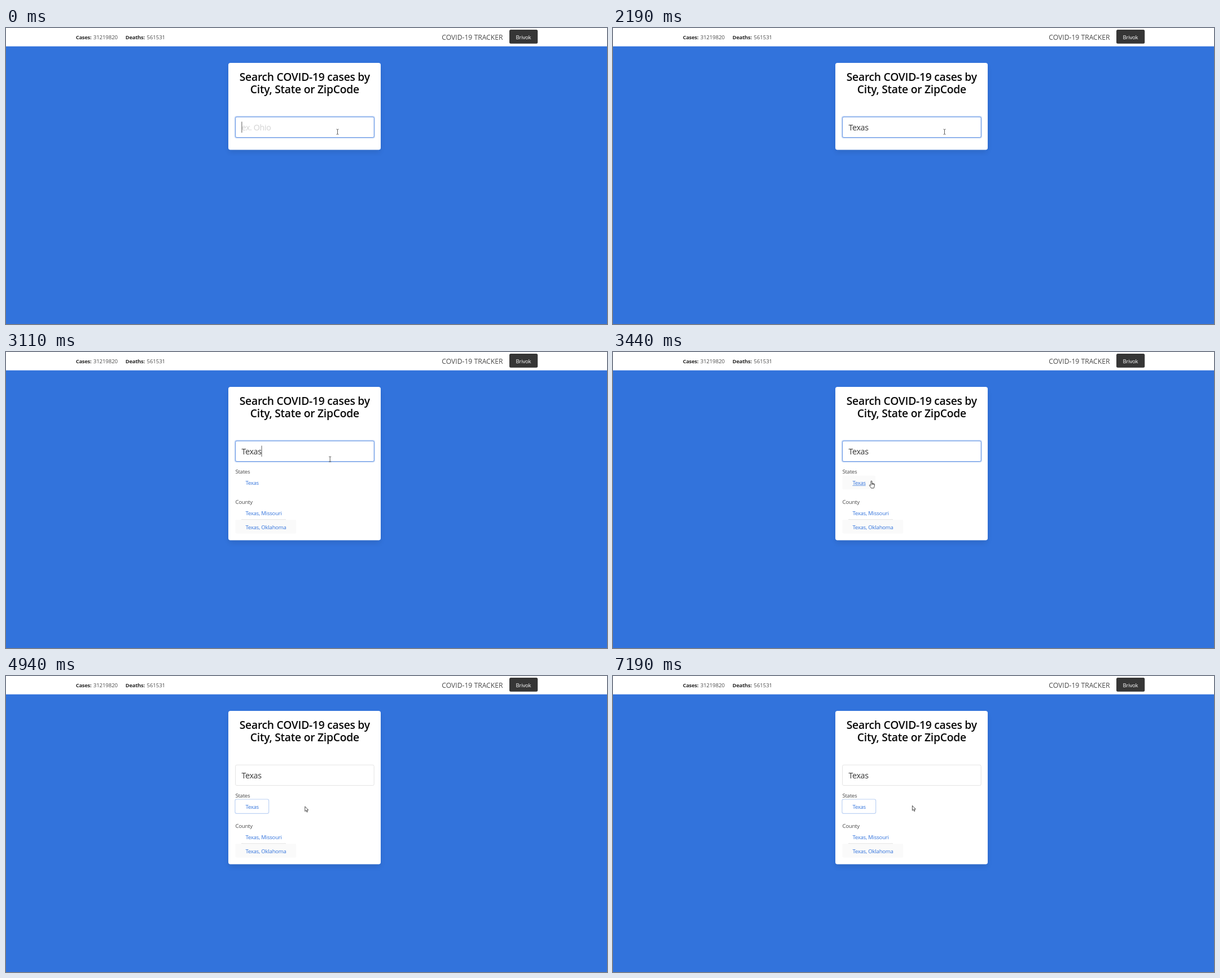
Recreate the animation shown at these times as an HTML page. Size 1065x526 px, loop 8000 ms.

```html
<!DOCTYPE html>
<html lang="en">
<head>
<meta charset="utf-8">
<title>Case search</title>
<style>
html, body { margin: 0; width: 100%; height: 100%; overflow: hidden; background: #3273dc; }
svg { display: block; width: 100%; height: 100%; }
text { font: 9.6px "Open Sans", "Noto Sans", sans-serif; letter-spacing: -.025em; fill: #4a4a4a; white-space: pre; }
.strong { font-size: 9.4px; font-weight: 700; fill: #2b2b2b; }
.num { letter-spacing: -.01em; }
.brand { font-size: 12.1px; letter-spacing: .002em; }
.title { font-size: 19.3px; font-weight: 600; letter-spacing: -.0135em; fill: #0a0a0a; }
.mid { text-anchor: middle; }
.field { font-size: 14.3px; fill: #363636; }
.link { fill: #3273dc; }
.cursor { fill: #fff; stroke: #111; stroke-width: .75; stroke-linejoin: round; }
</style>
</head>
<body>
<svg viewBox="0 0 1065 526">
  <defs>
    <filter id="blur" x="-20%" y="-20%" width="140%" height="150%"><feGaussianBlur stdDeviation="5"/></filter>
  </defs>
  <rect width="1065" height="526" fill="#3273dc"/>
  <rect width="1065" height="32.6" fill="#fff"/>
  <text class="strong" x="123.7" y="19.8">Cases:</text>
  <text class="num" x="154.8" y="19.8">31219820</text>
  <text class="strong" x="211.8" y="19.8">Deaths:</text>
  <text class="num" x="249.6" y="19.8">561531</text>
  <text class="brand" x="772.3" y="20.5">COVID-19 TRACKER</text>
  <rect x="892" y="3.1" width="50.2" height="24.6" rx="2.5" fill="#363636"/>
  <text class="mid" x="917" y="19.8" style="fill:#fff">Brivok</text>

  <rect id="shadow" x="395.2" y="68.2" width="267.6" fill="#0a0a0a" opacity=".11" filter="url(#blur)"/>
  <rect id="card" x="394" y="62" width="270" rx="3.75" fill="#fff"/>
  <text class="title mid" x="529.3" y="93.7">Search COVID-19 cases by</text>
  <text class="title mid" x="529.3" y="116.3">City, State or ZipCode</text>

  <rect id="glow" x="405.6" y="157.2" width="247.6" height="38.2" rx="3.2" fill="none" stroke="#3273dc" stroke-opacity=".25" stroke-width="1.7"/>
  <rect id="box" x="406.6" y="158.1" width="245.6" height="36.4" rx="2.4" fill="#fff" stroke-width=".75"/>
  <text id="hint" class="field" x="417.5" y="182" fill-opacity=".22">ex. Ohio</text>
  <text id="value" class="field" x="417.5" y="182"></text>
  <rect id="caret" y="166.5" width=".8" height="19.5" fill="#333"/>

  <g id="results">
    <text x="406.4" y="216.1">States</text>
    <g id="hover">
      <rect x="406.5" y="219.7" width="58.6" height="24.4" rx="2" fill="#fafafa"/>
      <path d="M424.4 237.3H447.8" stroke="#3273dc" stroke-width=".7"/>
    </g>
    <rect id="ring" x="405.9" y="219" width="59.8" height="25.3" rx="2.8" fill="none" stroke="#3273dc" stroke-opacity=".32" stroke-width="1.2"/>
    <text class="link" x="424.4" y="235.8">Texas</text>
    <text x="406.4" y="270.2">County</text>
    <text class="link" x="424.4" y="289.9">Texas, Missouri</text>
    <rect x="406.5" y="298" width="107.8" height="24.4" rx="2" fill="#fafafa"/>
    <path d="M417 297.6H496" stroke="#dbdbdb" stroke-width=".7"/>
    <text class="link" x="424.4" y="314.5">Texas, Oklahoma</text>
  </g>

  <path id="beam" fill="none" stroke="#333" stroke-width=".8" d="M-2-4.5H-.6L0-4L.6-4.5H2M0-4V4M-2 4.5H-.6L0 4L.6 4.5H2"/>
  <path id="arrow" class="cursor" d="M0 0V8.6L2 6.8L3.3 10L4.7 9.4L3.4 6.3H6Z"/>
  <path id="hand" class="cursor" d="M-1 .9Q-1 0 0 0T1 .9V4.2L4.5 5Q5.7 5.3 5.6 6.7L5 10Q4.6 12.6 4 12.8H-.3Q-1.4 11.4-3.6 8.2Q-4 6.8-2.6 7L-1 8.2ZM1 4.2V6.6M2.6 4.6V6.8M4.1 5V7"/>
</svg>
<script>
const LOOP = 8000, OPEN = 2220, CLICK = 4160, BLINK = 530;
const WORD = 'Texas', KEYS = [1320, 1530, 1830, 2060, 2160];

const $ = id => document.getElementById(id);
const set = (id, attrs) => { for (const k in attrs) $(id).setAttribute(k, attrs[k]); };
const show = (id, on) => $(id).setAttribute('visibility', on ? 'inherit' : 'hidden');

const home = { x: 587.5, y: 184.5 };
const moves = [
  { at: 2940, ms: 700, dx: -148.7, dy: 48.5, bow: 6 },
  { at: 4560, ms: 380, dx: 91, dy: -1.1, bow: 0 },
  { at: 5450, ms: 210, dx: 0, dy: -1.5, bow: 0 },
  { at: 7190, ms: 1, dx: .6, dy: 0, bow: 0 }
];

function ease(u, power = 2.4) {
  return u < .5 ? (2 * u) ** power / 2 : 1 - (2 - 2 * u) ** power / 2;
}

function pointer(t) {
  let { x, y } = home;
  for (const m of moves) {
    const p = ease(Math.min(1, Math.max(0, (t - m.at) / m.ms)));
    x += m.dx * p;
    y += m.dy * p + m.bow * Math.sin(Math.PI * p);
  }
  return { x, y };
}

// The caret stays lit while typing and blinks around it until the pointer settles.
function caretOn(t, count) {
  if (count && count < WORD.length) return true;
  const since = count ? OPEN - 100 : 230;
  return t < moves[0].at + moves[0].ms && Math.floor((t - since) / BLINK) % 2 !== 0;
}

function draw(t) {
  const count = KEYS.filter(k => k <= t).length;
  $('value').textContent = WORD.slice(0, count);
  show('hint', !count);
  show('caret', caretOn(t, count));
  set('caret', { x: 417.5 + $('value').getComputedTextLength() });

  const open = t >= OPEN, focused = t < CLICK;
  const height = open ? 272.6 : 154.4;
  set('card', { height });
  set('shadow', { height: height - 2.4 });
  show('results', open);
  show('glow', focused);
  show('ring', !focused);
  set('box', { stroke: focused ? '#3273dc' : '#dbdbdb' });
  if (!open) show('ring', false);

  const { x, y } = pointer(t);
  const over = open && x < 465.2 && y > 219.5 && y < 244.2;
  const kind = y < 194.5 ? 'beam' : over ? 'hand' : 'arrow';
  for (const id of ['beam', 'arrow', 'hand']) show(id, id === kind);
  set(kind, { transform: `translate(${x} ${y})` });
  show('hover', over);
}

const start = performance.now();
function tick() {
  draw((performance.now() - start) % LOOP);
  requestAnimationFrame(tick);
}
tick();
</script>
</body>
</html>
```
